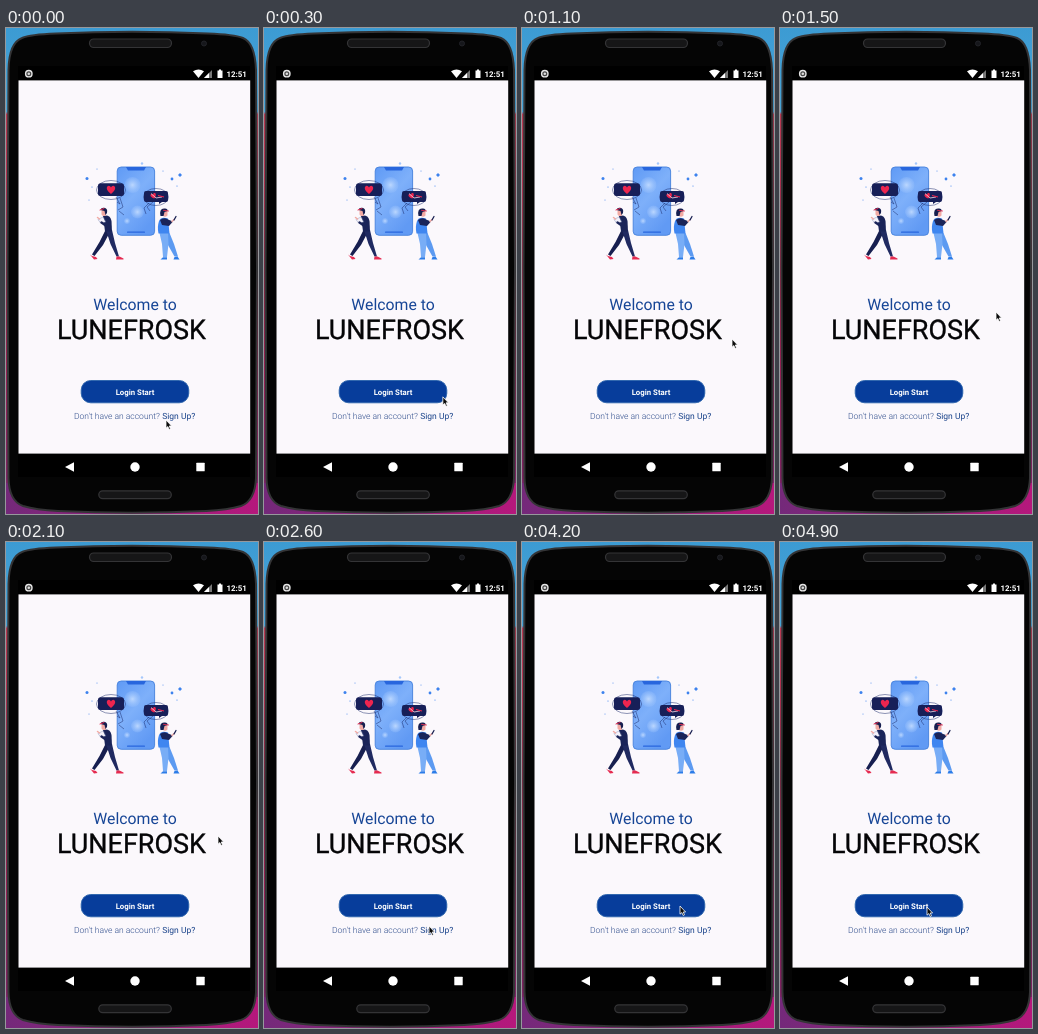
These frames come from a looping animation (252x486 px, 5000 ms). An HTML page:

```html
<!DOCTYPE html>
<html lang="en">
<head>
<meta charset="utf-8">
<title>Welcome screen</title>
<style>
  html, body { margin: 0; width: 100%; height: 100%; overflow: hidden; background: #050505; }
  svg { display: block; width: 252px; height: 486px; }
  text { font-family: Roboto, "Open Sans", sans-serif; text-rendering: geometricPrecision; }
</style>
</head>
<body>
<svg viewBox="0 0 252 486">
  <defs>
    <linearGradient id="wall" x2="0" y2="1">
      <stop offset="0" stop-color="#3c9bd3"/>
      <stop offset=".172" stop-color="#4aa4d6"/>
      <stop offset=".178" stop-color="#b83a52"/>
      <stop offset=".55" stop-color="#a8204c"/>
      <stop offset=".92" stop-color="#7c2260"/>
      <stop offset="1" stop-color="#78287a"/>
    </linearGradient>
    <linearGradient id="floor">
      <stop offset="0" stop-color="#74297a"/>
      <stop offset="1" stop-color="#b5187c"/>
    </linearGradient>
    <linearGradient id="glass" x2=".6" y2="1">
      <stop offset="0" stop-color="#5f9af5"/>
      <stop offset=".5" stop-color="#7eb0fa"/>
      <stop offset="1" stop-color="#619af4"/>
    </linearGradient>
    <radialGradient id="glow">
      <stop offset="0" stop-color="#c3dcff" stop-opacity=".9"/>
      <stop offset="1" stop-color="#a9ccff" stop-opacity=".2"/>
    </radialGradient>
    <path id="heart" d="M0 4.2C-6-.2-4.4-4-2.2-4Q-.6-4 0-2.2Q.6-4 2.2-4C4.4-4 6-.2 0 4.2Z"/>
  </defs>

  <!-- wallpaper and handset -->
  <rect width="252" height="486" fill="url(#wall)"/>
  <rect y="455" width="252" height="31" fill="url(#floor)"/>
  <path d="M2.5 42Q3 15 16 10Q24 6.5 50 5.5Q126 2 202 5.5Q228 6.5 237 10Q249 15 250 42L251 240L250 450Q249 473 235 478Q222 482 200 483Q126 486.5 52 483Q30 482 17 478Q3 473 2.5 450L1.5 240Z"
        fill="#050505" stroke="#343436" stroke-width="2"/>
  <g fill="#161617" stroke="#343436" stroke-width="1.2">
    <rect x="83.5" y="11" width="82" height="8.5" rx="4.2"/>
    <rect x="92.8" y="462.8" width="72.5" height="7.8" rx="3.9"/>
  </g>
  <circle cx="198" cy="15.5" r="2.5" fill="#16171b" stroke="#222328"/>
  <rect x="12" y="38" width="232" height="411" fill="#000"/>
  <rect x="12.5" y="52.4" width="231.7" height="373.2" fill="#fbf8fc"/>

  <!-- status and navigation bars -->
  <circle cx="22.8" cy="45.7" r="3.2" fill="#444" stroke="#e6e6e6" stroke-width="1.4"/>
  <circle cx="22.8" cy="45.7" r="1.3" fill="#ddd"/>
  <g fill="#fff">
    <path d="M187 43.3Q192.5 39.5 198 43.3L192.5 50Z"/>
    <path d="M206 42V50H198Z" fill="#777"/>
    <path d="M203 45V50H198Z"/>
    <path d="M211.5 42.5H213V41.5H215V42.5H216.5V50H211.5Z"/>
    <text x="220.5" y="48.8" font-size="7.9" font-weight="700">12:51</text>
    <path d="M59 439L68 434.3V443.7Z"/>
    <circle cx="129" cy="439" r="4.7"/>
    <rect x="190.3" y="434.8" width="8.4" height="8.4" rx=".5"/>
  </g>

  <!-- illustration -->
  <g fill="#3d82ee">
    <circle cx="81" cy="150.5" r="1.5"/>
    <circle cx="86" cy="159" r=".6"/>
    <circle cx="91" cy="141" r=".5"/>
    <circle cx="83" cy="172" r=".5"/>
    <circle cx="136" cy="135.5" r="1.2" fill="#a5c8fb"/>
    <circle cx="166" cy="151" r="1.4"/>
    <circle cx="157" cy="143" r=".5"/>
    <path d="M174 145L176 147L174 149L172 147Z"/>
    <circle cx="171" cy="158" r=".6"/>
  </g>
  <rect x="111.2" y="139" width="37.4" height="68.3" rx="4" fill="url(#glass)" stroke="#4580dc" stroke-width=".9"/>
  <path d="M120 139H140L138 142.6H122Z" fill="#2866dd"/>
  <rect x="121" y="203.5" width="18" height="1.3" rx=".6" fill="#2866dd"/>
  <circle cx="126.5" cy="157" r="8" fill="url(#glow)"/>
  <circle cx="131.5" cy="184" r="6.5" fill="url(#glow)"/>
  <circle cx="121" cy="193" r="3" fill="url(#glow)"/>
  <g fill="none" stroke="#1c2d6c" stroke-width=".5">
    <path d="M110 169L114 176L111 174M114 170L117 179L112 182M113 183L118 187"/>
    <path d="M147 174L141 179L144 183M143 175L138 180L140 186"/>
    <ellipse cx="105" cy="162" rx="14.5" ry="9.5"/>
    <ellipse cx="150" cy="169" rx="12.5" ry="8.5"/>
  </g>
  <rect x="92" y="155.3" width="26" height="12.7" rx="2.5" fill="#171f58"/>
  <path d="M140 163H160Q162 163 162 165V172Q162 174 160 174H156L153 176V174H140Q138 174 138 172V165Q138 163 140 163Z" fill="#171f58"/>
  <use href="#heart" x="105" y="161.8" fill="#ed254f"/>
  <use href="#heart" transform="translate(147.5 168) rotate(-18) scale(.65)" fill="#ed254f"/>
  <path d="M145 165.5L150 170L156 169" fill="none" stroke="#f7dce5" stroke-width=".8"/>
  <path d="M152 167.5L158 169" stroke="#ed254f" stroke-width="1.2"/>

  <!-- walker on the left -->
  <g stroke-linecap="round" stroke-linejoin="round">
    <path d="M99.5 202H105L97 217L88.5 228L86 226.5L93.5 214Z" fill="#171f50"/>
    <path d="M100 202H106L109 215L113 228.5H110.5L104.5 216Z" fill="#202a61"/>
    <path d="M84 226.5L86 228L90 229L91.5 231L88 231.5Z" fill="#e52b50"/>
    <path d="M110.5 228.5H113.5L117.5 230.5V231.5H110Z" fill="#e52b50"/>
    <path d="M97 188Q104 186 105.5 193L106 203.5H99Z" fill="#1a2459"/>
    <path d="M97 189L92 191.5L94.5 195L99.5 194Z" fill="#f4f2fb" stroke="#7480ac" stroke-width=".4"/>
    <path d="M102.5 192L100.5 198L95.5 194.5" fill="none" stroke="#1a2459" stroke-width="2.4"/>
    <path d="M93.5 191L91.5 189.5" stroke="#f2aaa3" stroke-width="1.5"/>
    <path d="M95.5 182H100V187.5Q97 189 95.5 186.5Z" fill="#f2aaa3"/>
    <path d="M94.5 182Q95 179.5 98 179.8Q102 180.2 101 185L99.5 187L98.5 183Z" fill="#171f50"/>
    <path d="M94 182L98 180.5" stroke="#e52b50" stroke-width="1"/>
  </g>

  <!-- walker on the right -->
  <g stroke-linecap="round" stroke-linejoin="round">
    <path d="M157 205H163.5L168 216L172 228.5H168.5L162 217Z" fill="#5c9af1"/>
    <path d="M153.5 205H162L162.5 216L161 229H157L156 216Z" fill="#78adf6"/>
    <path d="M157 229.3H161V231.5H154.5Z" fill="#2c7ce8"/>
    <path d="M168.5 229L171.5 228.5L173.5 231.5H167.5Z" fill="#2c7ce8"/>
    <path d="M153 193Q155 188 162 190.5L163.5 205.5H152.5Q151 199 153 193Z" fill="#3f86f0"/>
    <path d="M154 192Q158 189 162 191.5L167 193.5L163 198L156 197Z" fill="#1a2459"/>
    <path d="M166 193.5L168 191.5" stroke="#f2aaa3" stroke-width="1.5"/>
    <path d="M168 192L170 188.5" stroke="#171f50" stroke-width="1.3"/>
    <path d="M156.5 183H161.5V187.5Q159 190 156.5 187.5Z" fill="#f2aaa3"/>
    <path d="M154.5 188Q153 180.5 158 180.5Q162 180 161.5 183L158.5 184L157.5 188Z" fill="#171f50"/>
    <path d="M157.5 182.3L162.5 183" stroke="#e52b50" stroke-width=".9"/>
  </g>

  <!-- copy -->
  <g text-anchor="middle">
    <text x="129" y="281.8" font-size="15.8" fill="#164596">Welcome to</text>
    <text x="125.5" y="311" font-size="27" fill="#050507" stroke="#050507" stroke-width=".35">LUNEFROSK</text>
    <rect x="75.2" y="352.5" width="107.6" height="22.3" rx="9.5" fill="#073d9b" stroke="#2b64ac" stroke-width=".9"/>
    <text x="129" y="366.5" font-size="7.8" font-weight="700" fill="#fff">Login Start</text>
  </g>
  <text x="68" y="390.8" font-size="8.5" font-weight="300" fill="#2f4d8c">Don't have an account?</text>
  <text x="156.2" y="390.8" font-size="8.5" fill="#174189">Sign Up?</text>

  <path id="cursor" d="M0 0V8.2L1.8 6.6L3.2 9.5L4.5 8.8L3.2 6H5.6Z" fill="#0b0b0b" stroke="#fff" stroke-width=".8"/>
</svg>
<script>
  const LOOP = 5000, STEP = 100;
  // time, x, y of the pointer tip
  const route = [
    [0, 160, 392], [700, 204, 338], [1500, 216, 284], [1800, 216, 284],
    [2100, 212, 294], [2200, 212, 294], [2600, 165, 384], [2800, 164, 384],
    [3300, 163, 364], [3700, 163, 364], [4200, 158, 364], [4400, 156, 364],
    [4700, 156, 364], [4900, 147, 365]
  ];
  const cursor = document.getElementById("cursor");

  function pointerAt(t) {
    const i = route.findIndex(p => p[0] > t);
    if (i < 0) return route[route.length - 1].slice(1);
    const [t0, x0, y0] = route[i - 1], [t1, x1, y1] = route[i];
    const k = (t - t0) / (t1 - t0);
    return [x0 + (x1 - x0) * k, y0 + (y1 - y0) * k];
  }

  function draw(ms) {
    const t = Math.floor(ms % LOOP / STEP) * STEP;
    const [x, y] = pointerAt(t);
    cursor.setAttribute("transform", `translate(${x} ${y})`);
  }

  const start = performance.now();
  function tick() {
    draw(performance.now() - start);
    requestAnimationFrame(tick);
  }
  tick();
</script>
</body>
</html>
```
